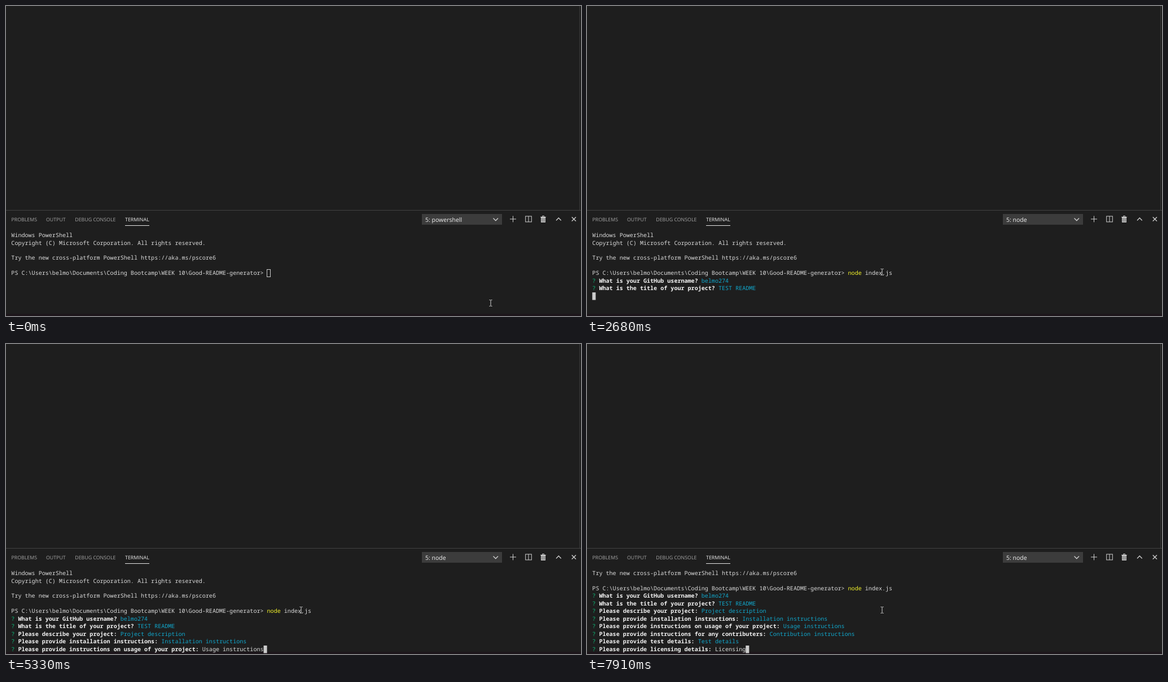
An HTML page with a canvas for the animation above (8000 ms loop, 1019 by 550 pixels).

```html
<!DOCTYPE html>
<html lang="en">
<head>
<meta charset="utf-8">
<title>README generator in the terminal</title>
<style>
  html, body { margin: 0; width: 100%; height: 100%; overflow: hidden; background: #1e1e1e; }
  canvas { display: block; width: 1019px; height: 550px; }
</style>
</head>
<body>
<canvas id="stage" width="1019" height="550"></canvas>
<script>
const ctx = document.getElementById('stage').getContext('2d');
const LOOP = 8000;
const CELL = 6.043, LINE = 13.44, LEFT = 9.35, TOP = 400.6, ROWS = 11;
const MONO = '10.07px "Noto Sans Mono", "DejaVu Sans Mono", monospace';
const UI = '"Open Sans", "Noto Sans", sans-serif';
const FG = '#dcdcdc', BOLD = '#f4f4f4', GREEN = '#0dbc79', CYAN = '#11a8cd', YELLOW = '#f5f52a';
const CURSOR = '#cccccc', ICON = '#d0d0d0';

const user = 'belmo';
const header = [
  'Windows PowerShell',
  'Copyright (C) Microsoft Corporation. All rights reserved.',
  '',
  'Try the new cross-platform PowerShell https://aka.ms/pscore6',
  ''
];
const prompt = `PS C:\\Users\\${user}\\Documents\\Coding Bootcamp\\WEEK 10\\Good-README-generator> `;

// Mouse travel and command times
const MOVE = [100, 340], FOCUS = 340, RECALL = 430, RUN = 540, RENAME = 620;

// keys: [time, characters typed so far]
const steps = [
  { ask: 860,  q: 'What is your GitHub username?', a: user + '274', keys: [[900, 0], [1280, 8]], enter: 1390 },
  { ask: 1450, q: 'What is the title of your project?', a: 'TEST README', keys: [[1480, 0], [1735, 7], [2400, 11]], enter: 2660 },
  { ask: 2730, q: 'Please describe your project:', a: 'Project description', keys: [[2740, 0], [3100, 19]], enter: 3140 },
  { ask: 3180, q: 'Please provide installation instructions:', a: 'Installation instructions', keys: [[3200, 0], [3445, 5], [3845, 13], [4345, 24], [4445, 25]], enter: 4500 },
  { ask: 4560, q: 'Please provide instructions on usage of your project:', a: 'Usage instructions', keys: [[4600, 0], [5225, 17], [5325, 18]], enter: 5430 },
  { ask: 5500, q: 'Please provide instructions for any contributers:', a: 'Contribution instructions', keys: [[5560, 0], [6650, 25]], enter: 6750 },
  { ask: 6850, q: 'Please provide test details:', a: 'Test details', keys: [[6920, 0], [7250, 12]], enter: 7340 },
  { ask: 7420, q: 'Please provide licensing details:', a: 'Licensing', keys: [[7470, 0], [7800, 8], [7905, 9]], enter: Infinity }
];

function ramp(keys, t) {
  if (t <= keys[0][0]) return keys[0][1];
  for (let i = 1; i < keys.length; i++) {
    const [t0, v0] = keys[i - 1], [t1, v1] = keys[i];
    if (t < t1) return v0 + (v1 - v0) * (t - t0) / (t1 - t0);
  }
  return keys[keys.length - 1][1];
}

// Each line is a list of [text, colour, bold] runs.
function linesAt(t) {
  const lines = header.map(s => [[s, FG]]);
  const command = [[prompt, FG]];
  if (t >= RECALL) command.push(['node', YELLOW], [' index.js', FG]);
  lines.push(command);
  if (t < RUN) return lines;
  for (const s of steps) {
    if (t < s.ask) {
      lines.push([]);
      return lines;
    }
    const done = t >= s.enter;
    const typed = s.a.slice(0, Math.floor(ramp(s.keys, t)));
    lines.push([['? ', GREEN], [s.q, BOLD, true], [' ' + (done ? s.a : typed), done ? CYAN : FG]]);
    if (!done) return lines;
  }
  return lines;
}

// Characters sit on the terminal grid.
function drawLine(runs, row) {
  const y = TOP + row * LINE + 9.5;
  let col = 0;
  for (const [text, colour, bold] of runs) {
    ctx.font = (bold ? '700 ' : '500 ') + MONO;
    ctx.fillStyle = colour;
    for (const ch of text) {
      if (ch !== ' ') ctx.fillText(ch, LEFT + col * CELL, y);
      col++;
    }
  }
  return col;
}

function drawCursor(col, row, focused) {
  const x = LEFT + col * CELL, y = TOP + row * LINE;
  if (focused) rect(x, y, CELL, LINE, CURSOR);
  else {
    ctx.strokeStyle = CURSOR;
    ctx.lineWidth = 1;
    ctx.strokeRect(Math.floor(x) + 0.5, Math.floor(y) + 0.5, 6, 13);
  }
}

function drawTerminal(t) {
  const lines = linesAt(t);
  const scroll = Math.max(0, lines.length - ROWS);
  let col = 0;
  lines.forEach((runs, i) => {
    if (i >= scroll) col = drawLine(runs, i - scroll);
  });
  drawCursor(col, lines.length - 1 - scroll, t >= FOCUS);
}

function rect(x, y, w, h, colour) {
  ctx.fillStyle = colour;
  ctx.fillRect(x, y, w, h);
}

function label(text, x, y, size, colour) {
  ctx.font = `${size}px ${UI}`;
  ctx.fillStyle = colour;
  ctx.fillText(text, x, y);
}

function path(...points) {
  ctx.beginPath();
  points.forEach(([x, y], i) => i ? ctx.lineTo(x, y) : ctx.moveTo(x, y));
  ctx.stroke();
}

function drawIcons() {
  ctx.strokeStyle = ICON;
  ctx.lineWidth = 1;
  path([893, 378], [904, 378]);
  path([898.5, 372.5], [898.5, 383.5]);
  ctx.strokeRect(920.7, 373, 10.6, 10);
  path([926, 373], [926, 383]);
  // Bin
  path([947, 374.5], [957, 374.5]);
  path([950.5, 374], [950.5, 372.5], [953.5, 372.5], [953.5, 374]);
  rect(948, 375, 8, 9, ICON);
  for (const x of [949.5, 951.7, 953.9]) rect(x, 376, 0.7, 7, '#1e1e1e');
  ctx.lineWidth = 1.3;
  path([863.5, 376.5], [867.8, 380.8], [872, 376.5]);
  path([975, 380.5], [979.3, 376], [983.7, 380.5]);
  path([1002.7, 374.5], [1010, 381.8]);
  path([1010, 374.5], [1002.7, 381.8]);
}

function drawPanel(t) {
  rect(0, 0, 1019, 550, '#1e1e1e');
  rect(1016, 0, 1, 362, '#383838');
  rect(0, 362, 1019, 1, '#414141');
  rect(0, 546, 1019, 4, '#1d161b');
  [['PROBLEMS', 9.5], ['OUTPUT', 71], ['DEBUG CONSOLE', 122.3]].forEach(([s, x]) => label(s, x, 382, 8.8, '#a6a6a6'));
  label('TERMINAL', 211, 382, 8.9, '#f0f0f0');
  rect(211, 389, 43, 1, '#e7e7e7');
  rect(737, 369, 142, 19, '#3c3c3c');
  label(t < RENAME ? '5: powershell' : '5: node', 743, 382.5, 10.5, '#f4f4f4');
  drawIcons();
}

function drawMouse(t) {
  const p = Math.min(1, Math.max(0, (t - MOVE[0]) / (MOVE[1] - MOVE[0])));
  const e = p * p * (3 - 2 * p);
  const x = Math.round(859 - 336 * e), y = Math.round(521 - 55 * e);
  rect(x - 0.5, y + 1, 1, 10, '#d4d4d4');
  for (const dy of [0, 11]) {
    rect(x - 2.5, y + dy, 2, 1, '#d4d4d4');
    rect(x + 0.5, y + dy, 2, 1, '#d4d4d4');
  }
}

const start = performance.now();
function frame() {
  const t = (performance.now() - start) % LOOP;
  ctx.textRendering = 'geometricPrecision';
  drawPanel(t);
  drawTerminal(t);
  drawMouse(t);
  requestAnimationFrame(frame);
}
frame();
</script>
</body>
</html>
```
